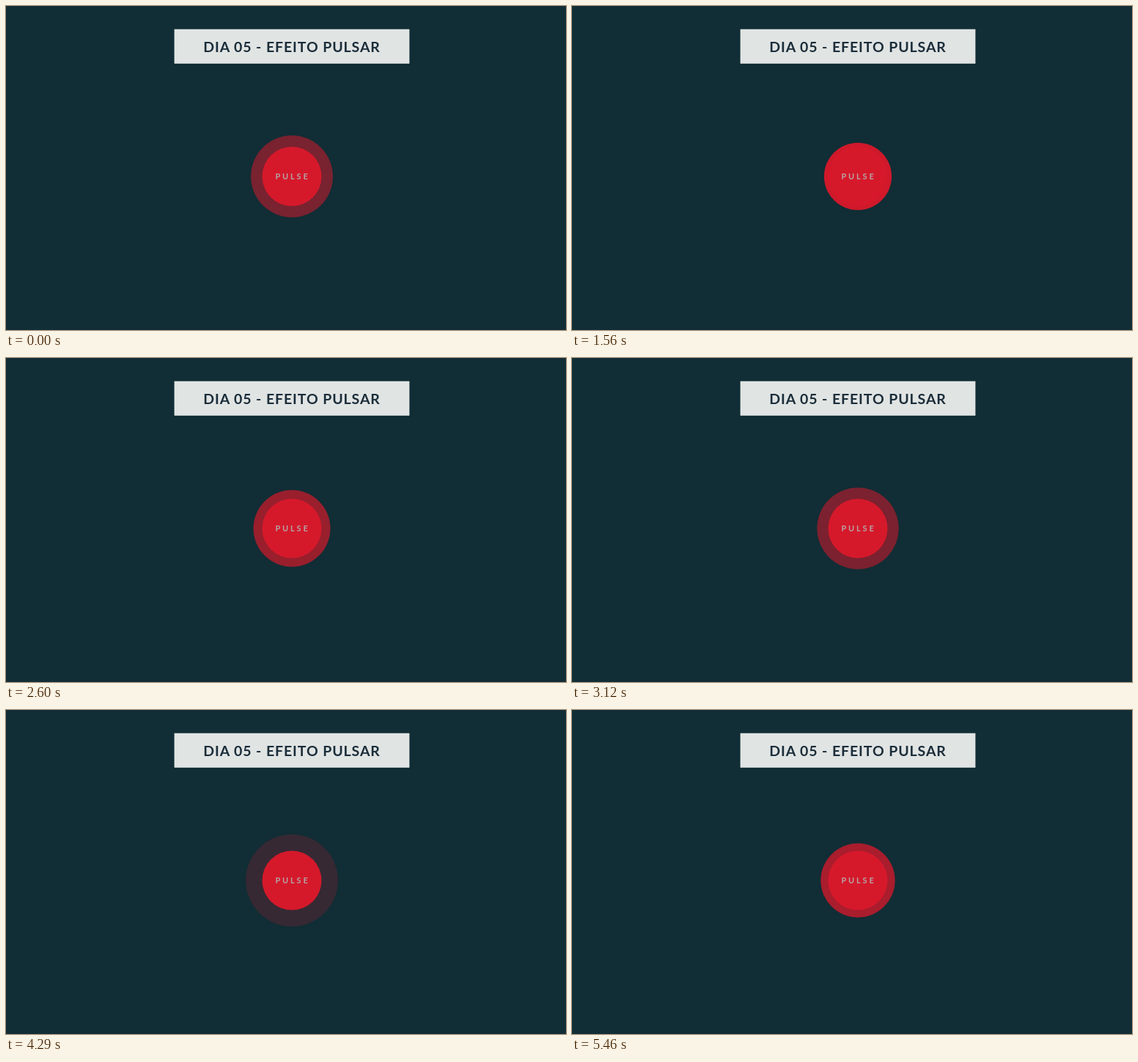
Recreate the animation shown at these times as an HTML page. Size 764 by 443 pixels, loop 5.59 s.

```html
<!DOCTYPE html>
<html lang="pt">
<head>
<meta charset="utf-8">
<title>Efeito pulsar</title>
<style>
  html, body { margin: 0; height: 100%; overflow: hidden; background: #112d35; }
  svg { display: block; }
  text { font-family: Lato, sans-serif; font-weight: 700; text-anchor: middle; }
  .title { font-size: 19.5px; letter-spacing: 0.9px; fill: #1b2d3a; }
  .label { font-size: 11px; letter-spacing: 2.8px; fill: #b9a2a5; }
  circle { fill: #d5192b; }
</style>
</head>
<body>
<svg width="764" height="443" viewBox="0 0 764 443">
  <rect x="229.6" y="31.7" width="320.8" height="47.1" fill="#e0e4e3"/>
  <text class="title" x="390" y="62.7">DIA 05 - EFEITO PULSAR</text>
  <circle id="ring" cx="390" cy="233"/>
  <circle cx="390" cy="233" r="40.5"/>
  <text class="label" x="391" y="237">PULSE</text>
</svg>
<script>
  const LOOP = 5590, STEP = 130;
  const PERIOD = 24.3, START = 13.4; // pulse length and initial phase, in steps
  const ring = document.getElementById('ring');

  function draw() {
    const step = Math.floor(performance.now() % LOOP / STEP);
    const phase = (step + START) % PERIOD / PERIOD;
    ring.setAttribute('r', 45.2 + 19.5 * phase);
    ring.setAttribute('opacity', 1 - 0.9 * phase ** 1.1);
    requestAnimationFrame(draw);
  }
  draw();
</script>
</body>
</html>
```
